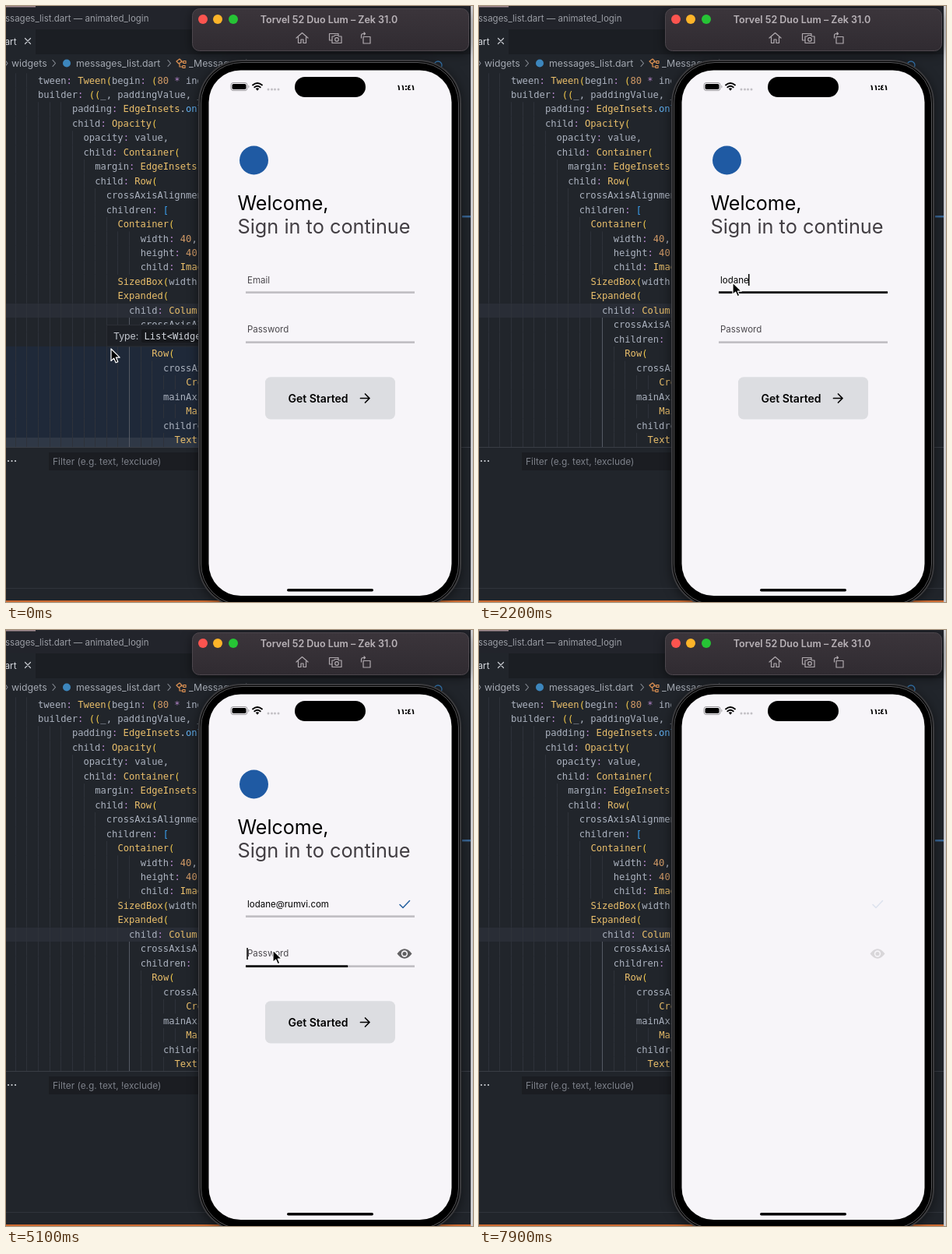
Write an HTML page that moves like this. It is 600 px wide and 765 px high and loops after 8000 ms.

```html
<!DOCTYPE html>
<html lang="en">
<head>
<meta charset="utf-8">
<title>Animated login</title>
<style>
  html, body { margin: 0; width: 100%; height: 100%; overflow: hidden; background: #21252b; }
  svg { display: block; width: 600px; height: 765px; font-family: Inter, "Open Sans", sans-serif; }
  text { white-space: pre; }
  .code { font: 12.13px "DejaVu Sans Mono", monospace; fill: #abb2bf; }
  .type { fill: #eabf6b; }
  .num { fill: #d19a66; }
  .op { fill: #b988d0; }
  .call { fill: #61afef; }
  .paren { fill: #f2c94c; }
  .square { fill: #3ba0f0; }
  .line { fill: none; stroke-linecap: round; stroke-linejoin: round; }
  .field { font-size: 11.5px; }
  .label { fill: #4b484d; }
  .dots { font-weight: 700; letter-spacing: 2.2px; }
  .clock { font: 700 9.8px "DejaVu Sans", sans-serif; letter-spacing: -.9px; }
  .window { filter: drop-shadow(0 3px 7px rgba(0, 0, 0, .5)); }

  .anim { animation: 8s linear infinite both; }
  .hover { animation-name: hover; }
  #form { animation-name: form; }
  #check { animation-name: check; }
  #eye { animation-name: eye; }
  #emailBar, #passBar { transform-box: fill-box; transform-origin: left; }
  #emailBar { animation-name: emailBar; }
  #passBar { animation-name: passBar; }
  #pointer { animation-name: pointer; animation-timing-function: ease-in-out; }

  @keyframes hover { 0%, 3.74% { opacity: 1 } 3.75%, 100% { opacity: 0 } }
  @keyframes form { 0%, 90% { opacity: 1 } 96.5%, 100% { opacity: 0 } }
  @keyframes check { 0%, 48.75% { opacity: 0 } 52.5%, 90% { opacity: 1 } 100% { opacity: 0 } }
  @keyframes eye { 0%, 61.25% { opacity: 0 } 65.4%, 90% { opacity: 1 } 100% { opacity: 0 } }
  @keyframes emailBar {
    0%, 13.75% { transform: scaleX(0) }
    17.9%, 61.24% { transform: scaleX(1) }
    61.25%, 100% { transform: scaleX(0) }
  }
  @keyframes passBar {
    0%, 61.25% { transform: scaleX(0) }
    65.4%, 100% { transform: scaleX(1) }
  }
  @keyframes pointer {
    0%, 1.25% { transform: translate(135px, 440px); opacity: 1 }
    7.5% { transform: translate(331px, 342px) }
    12%, 55% { transform: translate(326px, 355px) }
    60%, 83.5% { transform: translate(343px, 411px) }
    88%, 93.7% { transform: translate(418px, 506px); opacity: 1 }
    93.75%, 100% { transform: translate(418px, 506px); opacity: 0 }
  }
</style>
</head>
<body>
<svg viewBox="0 0 600 765">
  <defs>
    <clipPath id="pane"><rect y="86" width="247" height="480"/></clipPath>
    <linearGradient id="bar" x2="0" y2="1">
      <stop stop-color="#3b353b"/><stop offset="1" stop-color="#302b31"/>
    </linearGradient>
  </defs>

  <!-- editor -->
  <rect width="600" height="765" fill="#21252b"/>
  <rect width="600" height="30" fill="#22242b"/>
  <rect width="38" height="1.5" fill="#a58e94"/>
  <rect x="38" y="30" width="562" height="32" fill="#1b1e23"/>
  <text x="-1" y="19.5" font-size="11.5" fill="#9a9da4">ssages_list.dart — animated_login</text>
  <text x="-1.5" y="49.5" font-size="11.8" fill="#d7dae0">art</text>
  <path class="line" d="M24.5 41.5l7 7m0-7l-7 7" stroke="#c9ccd2" stroke-width="1.2"/>
  <g font-size="12.3" fill="#a3a8b1">
    <text x="7" y="77.5">widgets</text>
    <text x="90" y="77.5">messages_list.dart</text>
    <text x="235" y="77.5">_MessagesListState</text>
  </g>
  <path class="line" d="M-1 69.5l3 4-3 4M60 69.5l3.5 4-3.5 4M208 69.5l3.5 4-3.5 4" stroke="#8a8f98" stroke-width="1.1"/>
  <circle cx="78" cy="73.5" r="5" fill="#3c86bd"/>
  <path class="line" d="M219 71l4-3 3 3-4 3zM225 72h3m-5 2v4h4M228 70.5h3v3h-3zM227 76.5h3v3h-3z" stroke="#dd9152" stroke-width="1.2"/>
  <circle cx="555" cy="76" r="5" fill="none" stroke="#3576ae" stroke-width="1.3"/>

  <rect y="382" width="247" height="18" fill="#292d36"/>
  <g clip-path="url(#pane)">
    <g class="anim hover">
      <rect y="437" width="247" height="126" fill="#1f2939"/>
      <rect y="554" width="247" height="12" fill="#2f3846"/>
    </g>
    <g id="code"></g>
    <g class="anim hover">
      <rect x="129.5" y="409.5" width="130" height="27.5" fill="#1d2026" stroke="#2b2e35"/>
      <rect x="174" y="415" width="80" height="17" rx="2" fill="#16181c"/>
      <text x="138" y="428" font-size="12.3" fill="#c3c7cf">Type:</text>
      <text class="code" x="177.5" y="428" style="fill:#d5d9e0">List&lt;Widget&gt;</text>
    </g>
  </g>

  <rect y="566" width="600" height="1" fill="#393d45"/>
  <rect x="55" y="573" width="200" height="23" fill="#1b1d22"/>
  <text x="60" y="588.5" font-size="11.9" fill="#7d818a">Filter (e.g. text, !exclude)</text>
  <g fill="#d4d7dc"><circle cx="3" cy="584" r="1.1"/><circle cx="7.5" cy="584" r="1.1"/><circle cx="12" cy="584" r="1.1"/></g>
  <rect y="747" width="600" height="1" fill="#30343b"/>
  <rect y="763" width="600" height="2" fill="#cb6a31"/>
  <rect x="586" y="269" width="11" height="2.5" fill="#3a6796"/>
  <rect x="597" width="3" height="765" fill="#cdcdd0"/>

  <!-- simulator window -->
  <g class="window">
    <rect x="239.5" y="3.5" width="355" height="54" rx="9" fill="url(#bar)" stroke="#4d474d"/>
  </g>
  <circle cx="253" cy="17" r="6" fill="#fc544f"/>
  <circle cx="272" cy="17" r="6" fill="#fdb429"/>
  <circle cx="292" cy="17" r="6" fill="#26c435"/>
  <text x="415" y="21.5" font-size="12.5" font-weight="600" fill="#b9b3b8" text-anchor="middle">Torvel 52 Duo Lum – Zek 31.0</text>
  <g class="line" stroke="#b0aaaf" stroke-width="1.2">
    <path d="M373 41l7.5-6.5 7.5 6.5M375.5 40v7.5h3.5v-4.5h3v4.5h3.5v-7.5"/>
    <path d="M418 44h-2.5v-8.500h11.5v2M419 39h2.5l1-1.500h4l1 1.500h3.5v8.500h-12z"/>
    <circle cx="425" cy="43" r="2.3"/>
    <path d="M459 39.500h9v8.500h-9zM456.5 41v-3q0-2.500 2.500-2.500h2.500m-1.500-1.500l1.500 1.500-1.500 1.500"/>
  </g>

  <!-- phone -->
  <g class="window">
    <rect x="248" y="70" width="336" height="701" rx="55" fill="#000" stroke="#3b3b3e" stroke-width="2"/>
  </g>
  <rect x="250.5" y="72.5" width="331" height="696" rx="52.5" fill="none" stroke="#59595c"/>
  <rect x="260.5" y="82.5" width="312" height="674.5" rx="41" fill="#f7f5f9"/>
  <rect x="371" y="91" width="91" height="26" rx="13"/>
  <rect x="361" y="748" width="111" height="3.5" rx="1.75"/>
  <rect x="289" y="98.5" width="21" height="10" rx="3" fill="none" stroke="#99979b"/>
  <rect x="290.5" y="100" width="18" height="7" rx="1.8"/>
  <path d="M311.5 101.5q2 2 0 4z" fill="#99979b"/>
  <path class="line" d="M317 101.5q6-5 12 0M319.3 104.3q3.7-3 7.4 0" stroke="#000" stroke-width="1.9"/>
  <path d="M320.7 106q2.300-1.500 4.600 0l-2.300 2.700z"/>
  <g fill="#c2c0c5"><circle cx="337" cy="107" r="1.5"/><circle cx="341.5" cy="107" r="1.5"/><circle cx="345.5" cy="107" r="1.5"/><circle cx="350" cy="107" r="1.5"/></g>
  <text class="clock" x="513.5" y="107.5" text-anchor="middle">١١:٤١</text>

  <g id="form" class="anim">
    <circle cx="318.5" cy="198" r="18.5" fill="#1f5aa3"/>
    <text x="297.5" y="262" font-size="25">Welcome,</text>
    <text x="297.5" y="292" font-size="25.3" fill="#423e43">Sign in to continue</text>

    <rect x="308" y="366.3" width="217" height="2.7" fill="#c1bfc4"/>
    <rect id="emailBar" class="anim" x="308" y="366.3" width="217" height="2.7"/>
    <text id="emailLabel" class="field label" x="310" y="355.5">Email</text>
    <text id="emailText" class="field" x="310" y="355.5"></text>

    <rect x="308" y="430.3" width="217" height="2.7" fill="#c1bfc4"/>
    <rect id="passBar" class="anim" x="308" y="430.3" width="217" height="2.7"/>
    <text id="passLabel" class="field label" x="310" y="419">Password</text>
    <text id="passText" class="field" x="310" y="419"><tspan class="dots"></tspan><tspan></tspan></text>
    <rect id="caret" width="1.5" height="15"/>

    <rect x="333" y="476.3" width="167" height="54.3" rx="7" fill="#dcdde1"/>
    <text x="362.5" y="508.5" font-size="14" font-weight="600">Get Started</text>
    <path class="line" d="M455.5 503.5h11m-5-5.5l5.5 5.5-5.5 5.5" stroke="#000" stroke-width="1.7"/>
  </g>
  <path id="check" class="line anim" d="M506 352.5l4 4 8.5-9" stroke="#235f9f" stroke-width="1.5"/>
  <g id="eye" class="anim">
    <path d="M502.5 415.5q9.5-12.5 19 0q-9.500 12.500-19 0z"/>
    <circle cx="512" cy="415.5" r="4.2" fill="#f7f5f9"/>
    <circle cx="512" cy="415.5" r="2.6"/>
  </g>
  <g id="pointer" class="anim">
    <path d="M0 0v15.5l3.6-3.4 2.5 5.7 2.7-1.200-2.500-5.500h4.900z" stroke="#fff" stroke-width="1.2" stroke-linejoin="round"/>
  </g>
</svg>
<script>
const LOOP = 8000, STEP = 14.63, ROW = 18.46;
const byId = id => document.getElementById(id);

// indent level, then the code of the line
const lines = [
  [0, "tween: Tween(begin: (80 * index"], [0, "builder: ((_, paddingValue, _"],
  [3, "padding: EdgeInsets.only("], [3, "child: Opacity("], [4, "opacity: value,"],
  [4, "child: Container("], [5, "margin: EdgeInsets."], [5, "child: Row("],
  [6, "crossAxisAlignment:"], [6, "children: ["], [7, "Container("], [9, "width: 40,"],
  [9, "height: 40,"], [9, "child: Image"], [7, "SizedBox(width:"], [7, "Expanded("],
  [8, "child: Column("], [9, "crossAxisAlignment"], [9, "children: ["], [10, "Row("],
  [11, "crossAxis"], [13, "Cross"], [11, "mainAxis"], [13, "Main"], [11, "children"], [12, "Text("]
];

const rules = [
  [/^[A-Z]/, "type"], [/^\d/, "num"], [/^[:*]/, "op"],
  [/^only/, "call"], [/^\(/, "paren"], [/^\[/, "square"]
];
function paint(src) {
  return src.replace(/\w+|[:*([]/g, word => {
    const rule = rules.find(([re]) => re.test(word));
    return rule ? `<tspan class="${rule[1]}">${word}</tspan>` : word;
  });
}

function drawCode() {
  let guides = "", text = "";
  lines.forEach(([level, src], row) => {
    const mid = 95.5 + row * ROW;
    for (let g = -2; g < level; g++)
      guides += `M${Math.round(41 + g * STEP) + .5} ${mid - ROW / 2}v${ROW}`;
    text += `<text class="code" x="${41 + level * STEP}" y="${mid + 4}">${paint(src)}</text>`;
  });
  byId("code").innerHTML =
    `<path d="${guides}" stroke="#2e323a"/><path d="M158.5 400V566" stroke="#555a64"/>${text}`;
}

const email = "lodane@rumvi.com", secret = "123456";
const EMAIL_FOCUS = 1100, EMAIL_START = 1330, EMAIL_GAP = 165;
const PASS_FOCUS = 4900, PASS_START = 5550, PASS_GAP = 175;

const typed = (t, start, gap, max) =>
  Math.max(0, Math.min(max, Math.floor((t - start) / gap) + 1));
const lastInput = (count, focus, start, gap) =>
  count ? start + (count - 1) * gap : focus;

const [dots, lastChar] = byId("passText").children;

function draw(t) {
  const e = typed(t, EMAIL_START, EMAIL_GAP, email.length);
  const p = typed(t, PASS_START, PASS_GAP, secret.length);
  const reveal = p > 0 && t < 7000;
  byId("emailText").textContent = email.slice(0, e);
  byId("emailLabel").style.display = e ? "none" : "";
  dots.textContent = "·".repeat(reveal ? p - 1 : p);
  lastChar.textContent = reveal ? secret[p - 1] : "";
  byId("passLabel").style.display = p ? "none" : "";

  const onPass = t >= PASS_FOCUS;
  const idle = t - (onPass
    ? lastInput(p, PASS_FOCUS, PASS_START, PASS_GAP)
    : lastInput(e, EMAIL_FOCUS, EMAIL_START, EMAIL_GAP));
  const caret = byId("caret");
  const field = byId(onPass ? "passText" : "emailText");
  caret.setAttribute("x", 309.3 + (field.textContent ? field.getComputedTextLength() : 0));
  caret.setAttribute("y", onPass ? 408 : 344);
  caret.style.display = t >= EMAIL_FOCUS && t < 7200 && idle % 1000 < 500 ? "" : "none";
}

let start;
function tick() {
  const now = performance.now();
  start ??= now;
  draw((now - start) % LOOP);
  requestAnimationFrame(tick);
}
drawCode();
draw(0);
requestAnimationFrame(tick);
</script>
</body>
</html>
```
